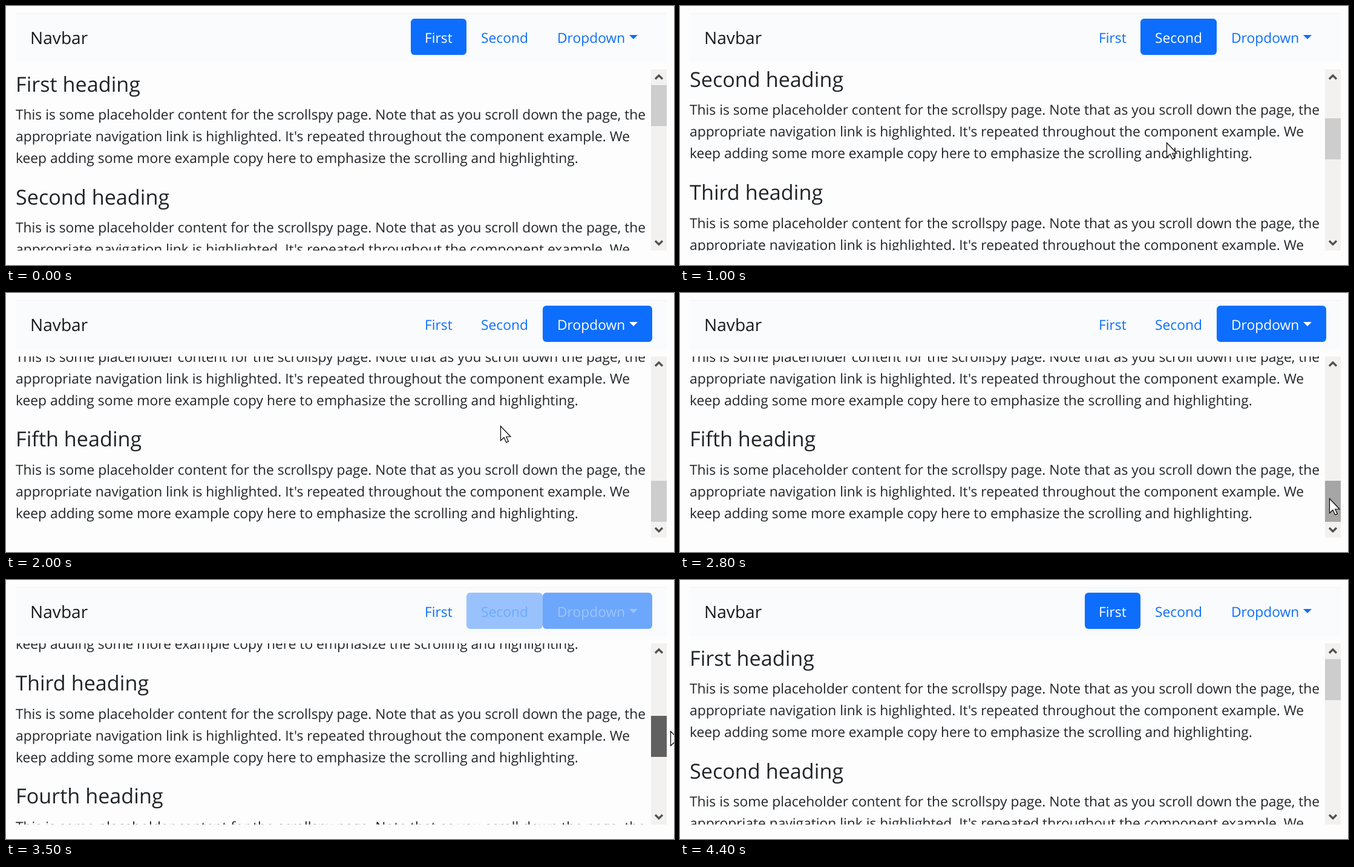
Animation of 1104x429 px, one loop 4900 ms. Source, as an HTML page:

```html
<!DOCTYPE html>
<html lang="en">
<head>
<meta charset="utf-8">
<title>Scrollspy</title>
<style>
  html, body { margin: 0; width: 100%; height: 100%; overflow: hidden; background: #fdfdfd; }
  svg { display: block; }
  text { font-family: "Open Sans", "Noto Sans", sans-serif; font-size: 22.8px; text-rendering: geometricPrecision; }
  #page { fill: #212529; }
  .heading { font-size: 34.2px; }
  .brand { font-size: 28.1px; fill: #191919; }
  .chevron { fill: none; stroke: #505050; stroke-width: 3.2; }
</style>
</head>
<body>
<svg width="1104" height="429" viewBox="0 0 1104 429">
  <rect x="16" y="12" width="1076" height="81" fill="#fafbfc"/>
  <rect x="16" y="12" width="1076" height="1" fill="#f0f2f8"/>
  <text class="brand" x="40" y="63">Navbar</text>
  <g class="link">
    <rect x="669" y="21" width="92" height="60" rx="6" fill="#0d6efd"/>
    <text x="692" y="61">First</text>
  </g>
  <g class="link">
    <rect x="761" y="21" width="126" height="60" rx="6" fill="#0d6efd"/>
    <text x="785" y="61">Second</text>
  </g>
  <g class="link">
    <rect x="887" y="21" width="181" height="60" rx="6" fill="#0d6efd"/>
    <text x="911" y="61">Dropdown</text>
    <path d="M1030 48h14l-7 7z"/>
  </g>

  <svg x="16" y="105" width="1050" height="300"><g id="page"></g></svg>

  <rect x="1066" y="105" width="26" height="300" fill="#f2f1f0"/>
  <path class="chevron" d="M1073 121l6-6 6 6M1073 389l6 6 6-6"/>
  <rect id="thumb" x="1066" width="26" height="68"/>
  <path id="cursor" d="M.5 .5V24.5L6 19.3 9.8 27.5 13.4 25.9 9.8 18H17z" fill="#fff" stroke="#000" stroke-width="1.2"/>
</svg>
<script>
const LOOP = 4900, STEP = 100, FADE = 150, SECTION = 187.2, MAX_SCROLL = 636;
const $ = id => document.getElementById(id);
const links = document.querySelectorAll('.link');

// [time, scroll offset]
const scrollKeys = [
  [600, 0], [700, 5], [800, 145], [900, 188], [1000, 195], [1100, 310], [1200, 375], [1300, 386],
  [1400, 480], [1500, 560], [1600, 576], [1700, 576], [1800, 611], [1900, 632], [2000, 636],
  [2800, 636], [2900, 625], [3000, 595], [3200, 502], [3800, 163], [4100, 0]
];
// [time, x, y]
const cursorKeys = [
  [200, 790, 320], [700, 804, 226], [1000, 804, 226], [1600, 814, 219], [2200, 818, 221],
  [2400, 853, 230], [2600, 1020, 310], [2700, 1043, 335], [2800, 1073, 340], [2900, 1075, 334],
  [3200, 1079, 296], [3500, 1098, 250], [3600, 1110, 232]
];
// [time, link that becomes active]
const switches = [[-FADE, 0], [830, 1], [1130, 2], [3460, 1], [3780, 0]];

function at(keys, t, k = 1) {
  const i = keys.findIndex(key => key[0] > t);
  if (i < 0) return keys[keys.length - 1][k];
  if (i === 0) return keys[0][k];
  const a = keys[i - 1], b = keys[i];
  return a[k] + (b[k] - a[k]) * (t - a[0]) / (b[0] - a[0]);
}

function linkLevel(link, t) {
  return switches.reduce((level, [start, active]) => {
    const p = Math.min(1, Math.max(0, (t - start) / FADE));
    const target = active === link ? 1 : 0;
    return level + (target - level) * Math.sin(p * Math.PI / 2);
  }, 0);
}

function addText(x, y, content, className = '') {
  const el = document.createElementNS('http://www.w3.org/2000/svg', 'text');
  el.setAttribute('x', x);
  el.setAttribute('y', y);
  el.setAttribute('class', className);
  el.textContent = content;
  $('page').append(el);
}

const lines = [
  'This is some placeholder content for the scrollspy page. Note that as you scroll down the page, the',
  "appropriate navigation link is highlighted. It's repeated throughout the component example. We",
  'keep adding some more example copy here to emphasize the scrolling and highlighting.'
];
['First', 'Second', 'Third', 'Fourth', 'Fifth'].forEach((name, i) => {
  const top = i * SECTION;
  addText(0, Math.round(top + 36.6), name + ' heading', 'heading');
  lines.forEach((line, n) => addText(0, Math.round(top + 83.1 + n * 36), line));
});

function draw(now) {
  const t = Math.floor(now % LOOP / STEP) * STEP;
  const scroll = Math.round(at(scrollKeys, t));
  $('page').setAttribute('transform', `translate(0 ${-scroll})`);

  const thumb = $('thumb');
  thumb.setAttribute('y', Math.round(131 + scroll * 180 / MAX_SCROLL));
  thumb.setAttribute('fill', t < 2800 || t >= 4400 ? '#cdcdcd' : t < 2900 ? '#a6a6a6' : '#606060');

  const cursor = $('cursor');
  const x = Math.round(at(cursorKeys, t)), y = Math.round(at(cursorKeys, t, 2));
  cursor.setAttribute('transform', `translate(${x} ${y})`);
  cursor.setAttribute('visibility', t >= 200 && t < 3600 ? 'visible' : 'hidden');

  links.forEach((link, i) => {
    const level = linkLevel(i, t);
    const mix = [13, 110, 253].map(c => Math.round(c + (255 - c) * level));
    link.setAttribute('fill', `rgb(${mix})`);
    link.firstElementChild.setAttribute('fill-opacity', level);
  });
  requestAnimationFrame(draw);
}
draw(0);
</script>
</body>
</html>
```
